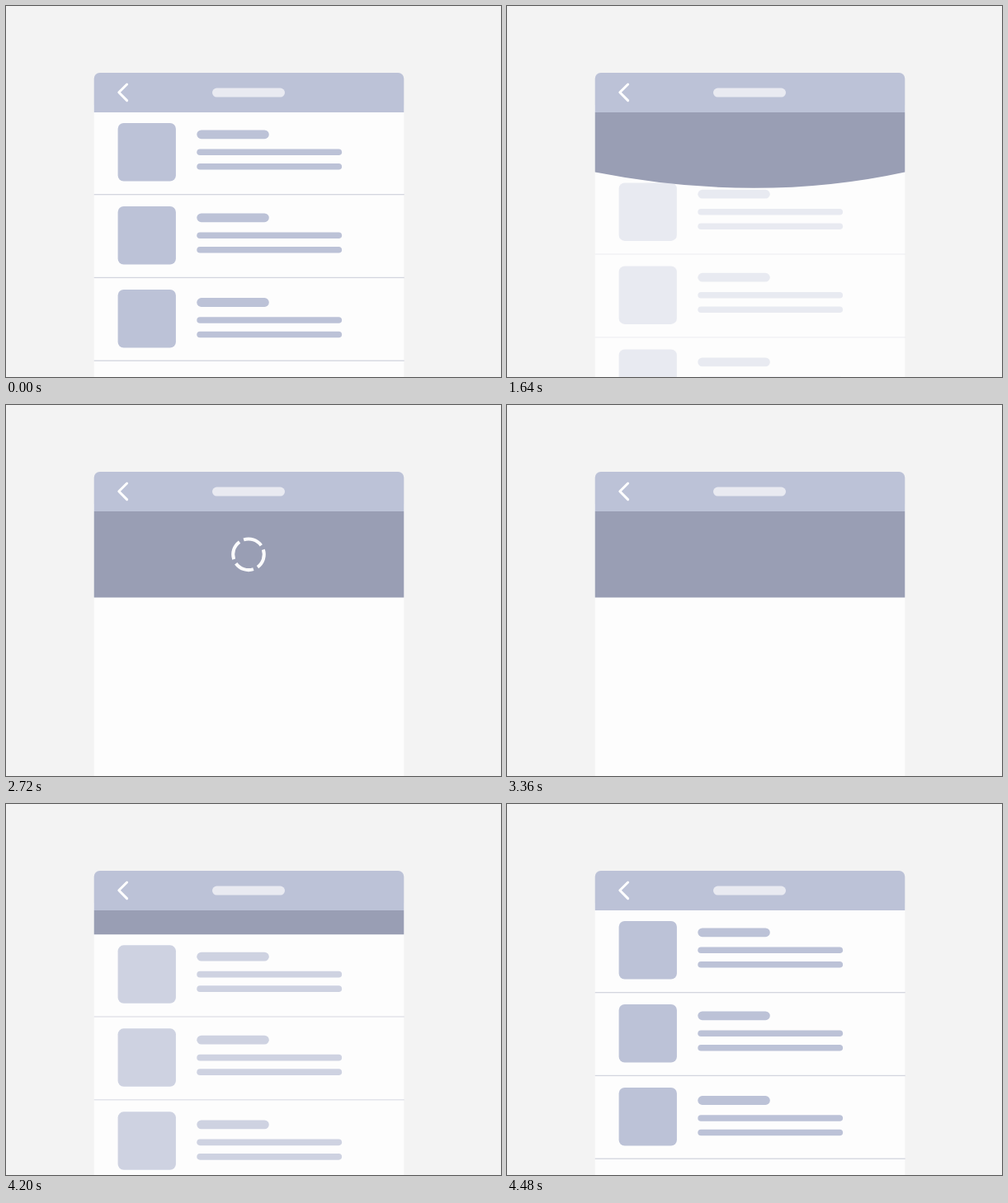
These frames come from a looping animation (600 by 450 pixels, 4720 ms). An HTML page:

```html
<!DOCTYPE html>
<html lang="en">
<head>
<meta charset="utf-8">
<title>Pull to refresh</title>
<style>
  html, body { margin: 0; width: 100%; height: 100%; overflow: hidden; background: #f3f3f3; }
  svg { display: block; width: 100%; height: 100%; }
</style>
</head>
<body>
<svg viewBox="0 0 600 450">
  <defs>
    <g id="text">
      <rect x="231.3" y="150.4" width="87.5" height="10.8" rx="5.4"/>
      <rect x="231.3" y="173.5" width="175.8" height="7.6" rx="3.8"/>
      <rect x="231.3" y="191" width="175.8" height="7.6" rx="3.8"/>
    </g>
  </defs>
  <path d="M106.7 120H482.3V450H106.7Z" fill="#fdfdfd"/>
  <path id="gap" fill="#999eb4"/>
  <g id="list" fill="#bcc2d7"></g>
  <path d="M106.7 129V88a7 7 0 0 1 7-7H475.3a7 7 0 0 1 7 7V129Z" fill="#bcc2d7"/>
  <rect x="250" y="99.6" width="88" height="11" rx="5.5" fill="#e9eaf1"/>
  <path d="M146.6 95L136.8 104.8L146.6 114.6" fill="none" stroke="#fff" stroke-width="3" stroke-linecap="round" stroke-linejoin="round"/>
  <circle id="spinner" cx="294" cy="181.3" r="18.8" pathLength="360" fill="none" stroke="#fdfdfd" stroke-width="4" stroke-dasharray="72 18" stroke-dashoffset="-9"/>
</svg>
<script>
const LOOP = 4720, STEP = 40, TOP = 129, PULL = 104.5, BULGE = 28;
const $ = id => document.getElementById(id);
const gap = $('gap'), list = $('list'), spinner = $('spinner');

list.innerHTML = [0, 1, 2].map(i => `
  <rect x="135.6" y="${142 + i * 101}" width="70.3" height="70.5" rx="7"/>
  <use href="#text" y="${[0, 101, 203.7][i]}"/>
  <rect x="106.7" y="${228 + i * 100.8}" width="376" height="1.3" fill="#d3d5de"/>`).join('');

const span = (t, from, to) => Math.min(1, Math.max(0, (t - from) / (to - from)));
const smooth = x => x * x * (3 - 2 * x);

// Cubic Bezier easing, solved by bisection
function bezier(x, x1, y1, x2, y2) {
  const at = (s, a, b) => 3 * s * (1 - s) * ((1 - s) * a + s * b) + s ** 3;
  let lo = 0, hi = 1;
  for (let i = 0; i < 24; i++) {
    const mid = (lo + hi) / 2;
    if (at(mid, x1, x2) < x) lo = mid; else hi = mid;
  }
  return at(hi, y1, y2);
}

// The list jumps a third of the way, then eases out; later it slides back
function pulled(t) {
  if (t < 1520) return 0;
  if (t < 3920) return 1 - 0.675 * (1 - span(t, 1520, 2040)) ** 3;
  return 1 - bezier(span(t, 3920, 4480), 0.25, 0.21, 0.47, 1);
}

function draw(t) {
  const p = pulled(t);
  const edge = TOP + PULL * p;
  const flat = smooth(span(t, 2040, 2520));
  const bulge = t < 3920 ? BULGE * p * (1 - flat) : 0;
  gap.setAttribute('d', `M106.7 ${TOP}H482.3V${edge}Q304 ${edge + 2 * bulge} 106.7 ${edge}Z`);
  list.setAttribute('transform', `translate(0 ${PULL * p})`);
  list.setAttribute('opacity', 1 - p);

  const leave = span(t, 2680, 3200);
  const turn = 60 - 180 * (1 - flat) + 180 * smooth(leave);
  spinner.setAttribute('transform', `rotate(${turn} 294 181.3)`);
  spinner.setAttribute('opacity', flat * (1 - smooth(leave)));
}

const start = performance.now();
function tick() {
  const t = (performance.now() - start) % LOOP;
  draw(Math.floor(t / STEP) * STEP);
  requestAnimationFrame(tick);
}
tick();
</script>
</body>
</html>
```
